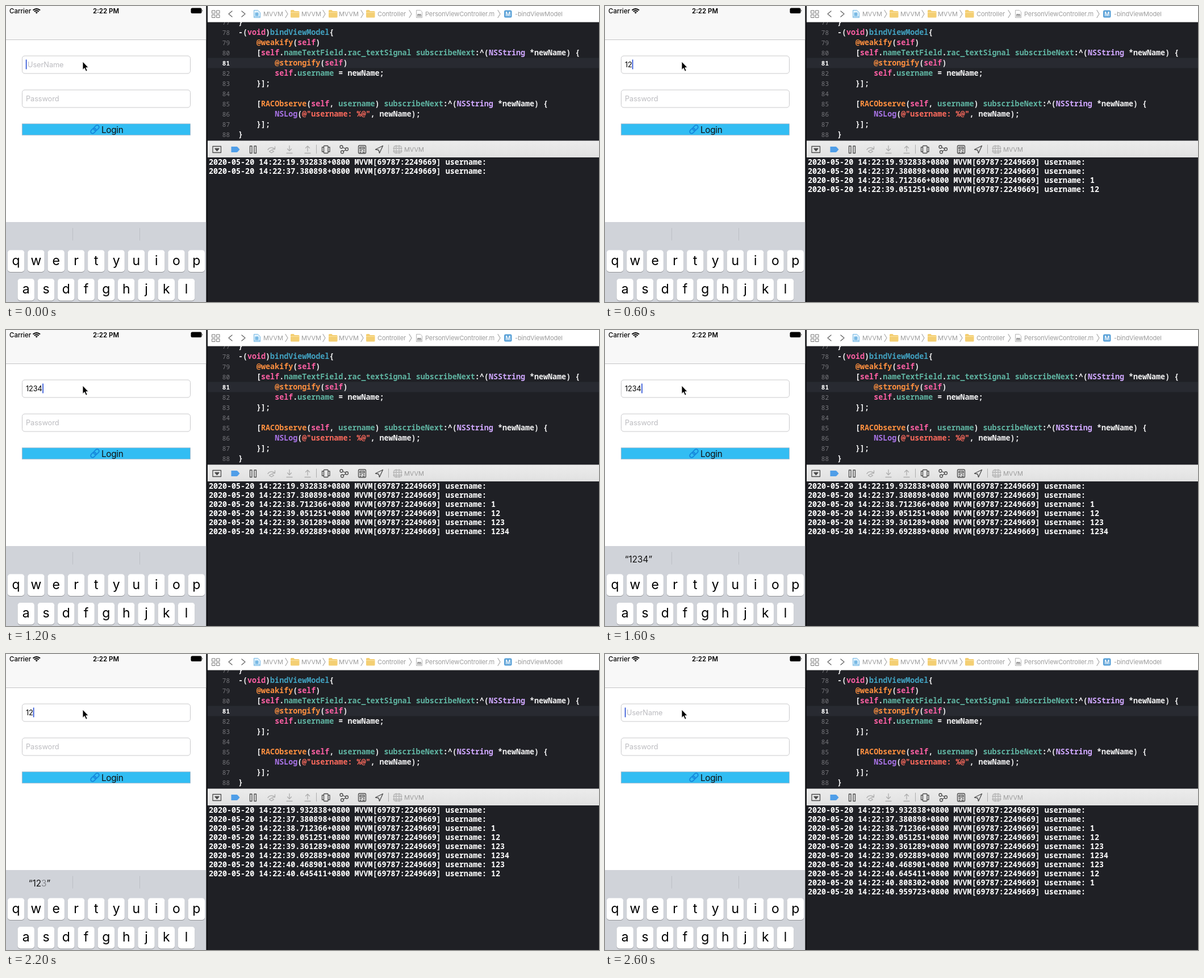
An HTML page that plays this animation: 1044 px wide and 522 px high, repeating every 3000 ms.

```html
<!DOCTYPE html>
<html lang="en">
<head>
<meta charset="utf-8">
<title>Text field binding</title>
<style>
  html, body { margin: 0; width: 100%; height: 100%; overflow: hidden; background: #1f2025; }
  svg { display: block; width: 100%; height: 100%; font-family: Inter, Roboto, sans-serif; }
  text { white-space: pre; }
  .line { fill: none; stroke: #4c4c4c; stroke-width: 1.3; stroke-linejoin: round; stroke-linecap: round; }
  .faint { stroke: #adadad; }
  .field { fill: #fff; stroke: #c9c9cb; }
  .input { font-size: 12.8px; letter-spacing: -.1px; }
  .hint { fill: #bcbcc0; }
  .key { font-size: 23px; text-anchor: middle; }
  .crumb { font-size: 11px; letter-spacing: -.12px; fill: #9c9c9c; }
  .mono { font: 600 13.37px "Noto Sans Mono", "DejaVu Sans Mono", monospace; fill: #f2f2f3; }
  .log { font-weight: 700; fill: #fff; }
  .num { font: 11px "Noto Sans Mono", monospace; fill: #77777c; text-anchor: end; }
  .macro { fill: #fd8f3f; }
  .word { fill: #fc5fa3; font-weight: 700; }
  .str { fill: #fc6a5d; }
  .type { fill: #d0a8ff; }
  .call { fill: #a873e6; }
  .name { fill: #41a1c0; }
  .prop { fill: #5fb3a1; }
</style>
</head>
<body>
<svg viewBox="0 0 1044 522">
  <defs>
    <linearGradient id="bar" x2="0" y2="1">
      <stop stop-color="#ececec"/><stop offset="1" stop-color="#e1e1e1"/>
    </linearGradient>
  </defs>

  <!-- editor and console -->
  <rect x="352" width="692" height="522" fill="#1f2025"/>
  <rect x="355" y="91.5" width="689" height="18" fill="#282a31"/>
  <g id="code"></g>
  <g id="log"></g>

  <!-- path bar -->
  <rect x="355" width="689" height="28.5" fill="#fff"/>
  <g class="line" stroke-width="1">
    <path d="M363 8h5v5h-5zM371 8h5v5h-5zM363 15.500h5v5h-5zM371 15.500h5v5h-5z" style="stroke:#777;stroke-width:1"/>
    <path d="M398 9l-6 5 6 5M415 9l6 5-6 5" style="stroke:#666"/>
  </g>
  <path d="M436.500 7.500h7l4 4v9h-11z" fill="#dff1fd" stroke="#78b9e4"/>
  <path d="M439 12h5v5h-5zM437 18.500h10" fill="#78b9e4" stroke="#78b9e4"/>
  <path d="M722.500 7.500h7l3 3v10h-10z" fill="#fff" stroke="#b5b5b5"/>
  <text x="724" y="18.500" font-size="8" font-weight="700" fill="#666">m</text>
  <rect x="877" y="7.500" width="13.500" height="13" rx="2.500" fill="#5ba2d8"/>
  <text x="879.300" y="17.700" font-size="10" font-weight="600" fill="#fff">M</text>
  <g id="crumbs"></g>

  <!-- debug bar -->
  <rect x="355" y="237.500" width="689" height="29.500" fill="url(#bar)"/>
  <g class="line">
    <rect x="364" y="247.500" width="14.500" height="11"/>
    <path d="M368 251.500h7l-3.500 4z" fill="#4c4c4c"/>
    <path d="M429.500 247h3.500v12.500h-3.500zM437 247h3.500v12.500h-3.500z"/>
    <rect x="559.500" y="246.500" width="7.500" height="13" rx="1"/>
    <path d="M559 249h-2.500v8h2.500M567.500 249h2.500v8h-2.500"/>
    <circle cx="590.500" cy="248.500" r="2.500"/><circle cx="600" cy="252.500" r="2.500"/><circle cx="592" cy="257.500" r="2.500"/>
    <path d="M593 249.500l4.500 2M594 256l4-2.200"/>
    <rect x="620.500" y="246" width="13" height="14" rx="2"/>
    <path d="M623 249h8v3h-8zM623 255h3M629 255h2M623 258h2M628 258h3"/>
    <path d="M650.500 253l13-6.500-6 13-1.500-5.500z"/>
  </g>
  <g class="line faint">
    <path d="M461 253.500a7 6 0 0 1 12-1.500m.5-4v4.500h-4.500M467.500 254l4 2.500-4 2.500-4-2.500z"/>
    <path d="M499 246.500v9m-3.500-3.500l3.500 3.500 3.500-3.500M494 259.500h10"/>
    <path d="M531 256v-9m-3.500 3.500l3.500-3.500 3.500 3.500M526 259.500h10"/>
    <path d="M546.500 245v15M673.500 245v15" stroke-width="1"/>
    <g stroke-dasharray="2 1.300">
      <rect x="683" y="247" width="13" height="12" rx="2"/>
      <path d="M687 246v14M692 246v14M682 251h15M682 256h15"/>
    </g>
  </g>
  <path d="M396.500 248h9.500q1 0 2 1l3.500 4-3.500 4q-1 1-2 1h-9.500z" fill="#4f9ee8"/>
  <text class="crumb" x="701" y="257">MVVM</text>

  <!-- phone -->
  <rect width="352.500" height="522" fill="#fff"/>
  <rect width="352.500" height="59" fill="#f8f8f8"/>
  <path d="M0 59.500h352.500" stroke="#c4c4c6"/>
  <text x="6" y="13" font-size="11.500" font-weight="500">Carrier</text>
  <g fill="none" stroke="#000" stroke-width="2">
    <path d="M47.500 7.500q6.300-5 12.600 0M49.800 9.800q4-3.200 8 0"/>
  </g>
  <path d="M51.600 11.200q2.200-1.600 4.400 0l-2.200 2.300z"/>
  <text x="153" y="13" font-size="11.500" font-weight="600">2:22 PM</text>
  <rect x="325.500" y="3.500" width="19" height="9.500" rx="2.500"/>
  <path d="M345.500 6.500q1.800 1.700 0 3.500z"/>

  <rect class="field" x="28.500" y="88" width="296" height="31" rx="4.500"/>
  <rect class="field" x="28.500" y="148" width="296" height="31" rx="4.500"/>
  <text class="input hint" x="38" y="107.800" id="hint">UserName</text>
  <text class="input" x="35" y="107.800" id="value"></text>
  <rect id="caret" y="94.500" width="1.700" height="17" fill="#3155d6"/>
  <text class="input hint" x="35" y="167.800">Password</text>
  <rect x="28.300" y="207.800" width="296.200" height="20" fill="#32bdf3" stroke="#a9b6c6" stroke-width=".8"/>
  <g fill="none" stroke="#1688dc" stroke-width="1.900" transform="translate(156.500 217.500) rotate(-45)">
    <rect x="-9" y="-3.300" width="10.500" height="6.600" rx="3.300"/>
    <rect x="-1.500" y="-3.300" width="10.500" height="6.600" rx="3.300"/>
  </g>
  <text x="168" y="223.500" font-size="15.300" letter-spacing="-.3" fill="#111">Login</text>

  <!-- keyboard -->
  <rect y="381" width="352.500" height="141" fill="#d0d3d9"/>
  <path d="M117.500 391.500v22M235.500 391.500v22" stroke="#bcbfc5"/>
  <text id="suggest" x="59" y="410" font-size="15.300" text-anchor="middle" fill="#111"></text>
  <g id="keys"></g>
  <rect x="352.500" width="2.500" height="522" fill="#111215"/>

  <path d="M135 98v14.500l3.300-3 2.400 5.700 2.500-1-2.400-5.500h4.400z" fill="#000" stroke="#fff" stroke-width=".9"/>
</svg>

<script>
const $ = id => document.getElementById(id);
const text = (x, y, cls, body) => `<text x="${x}" y="${y}" class="${cls}">${body}</text>`;

// Syntax colouring: first matching rule wins
const rules = [
  ['str', '@"[^"]*"'],
  ['macro', '@weakify|@strongify|RACObserve'],
  ['word', 'self|void'],
  ['type', 'NSString'],
  ['call', 'NSLog'],
  ['name', 'bindViewModel'],
  ['prop', 'nameTextField|rac_textSignal|subscribeNext|username']
];
const token = new RegExp(rules.map(r => `(?<${r[0]}>${r[1]})`).join('|'), 'g');
const paint = line => line.replace(token, (word, ...rest) => {
  const groups = rest.pop();
  return `<tspan class="${Object.keys(groups).find(k => groups[k])}">${word}</tspan>`;
});

const source = `}
-(void)bindViewModel{
    @weakify(self)
    [self.nameTextField.rac_textSignal subscribeNext:^(NSString *newName) {
        @strongify(self)
        self.username = newName;
    }];

    [RACObserve(self, username) subscribeNext:^(NSString *newName) {
        NSLog(@"username: %@", newName);
    }];
}`.split('\n');

$('code').innerHTML = source.map((line, i) => {
  const y = 33 + i * 18, n = 77 + i;
  const indent = line.length - line.trimStart().length;
  const style = n === 81 ? 'num" style="fill:#fff;font-weight:700' : 'num';
  return text(394, y, style, n) + text(409 + indent * 8.02, y, 'mono', paint(line.trim()));
}).join('');

const crumbs = [[453, 'MVVM', 494], [520, 'MVVM', 560], [586, 'MVVM', 627], [654, 'Controller', 712],
  [738, 'PersonViewController.m', 868], [896, '-bindViewModel']];
$('crumbs').innerHTML = crumbs.map(([x, label, arrow]) => text(x, 18, 'crumb', label) +
  (arrow ? `<path class="line faint" d="M${arrow - 2} 7.500l4 6.500-4 6.500"/>` : '')).join('') +
  [501, 568, 634].map(x => `<path d="M${x} 8.500q0-1.500 1.500-1.500h4l1.500 2h7q1.500 0 1.500 1.500v8.500q0 1.500-1.500 1.500h-12.500q-1.500 0-1.500-1.500z" fill="#f4cf73"/>
    <path d="M${x} 11.500h15.500" stroke="#fae3a6"/>`).join('');

const keyRow = (letters, x0, y) => [...letters].map((c, i) => {
  const x = x0 + i * 35.3;
  const cap = (dy, fill) => `<rect x="${x - 14.7}" y="${y + dy}" width="29.400" height="38.500" rx="4.700" fill="${fill}"/>`;
  return cap(1, '#8f9196') + cap(0, '#fff') + text(x, y + 26, 'key', c);
}).join('');
$('keys').innerHTML = keyRow('qwertyuiop', 17.6, 430.5) + keyRow('asdfghjkl', 35.2, 481);

// Typing: four characters go in, then four are deleted
const edits = [200, 400, 800, 1200, 2000, 2200, 2400, 2600];
const typed = n => '1234'.slice(0, 4 - Math.abs(4 - n));
const caretX = [34.8, 40.3, 47.8, 56, 64.2];
const stamps = ['19.932838', '37.380898', '38.712366', '39.051251', '39.361289',
  '39.692889', '40.468901', '40.645411', '40.808302', '40.959723'];
$('log').innerHTML = stamps.map((s, i) => text(357, 279.5 + i * 16, 'mono log',
  `2020-05-20 14:22:${s}+0800 MVVM[69787:2249669] username: ${typed(Math.max(0, i - 1))}`)).join('');
const logRows = [...$('log').children];

function suggestion(t) {
  if (t < 1400 || t >= 2600) return '';
  if (t < 2200) return '“1234”';
  return t < 2400 ? '“12<tspan fill="#85878c">3</tspan>”' : '“12”';
}

let shown = -1;
function draw() {
  const t = performance.now() % 3000;
  const step = Math.floor(t / 200);
  if (step !== shown) {
    shown = step;
    const n = edits.filter(e => e <= t).length;
    const value = typed(n);
    $('value').textContent = value;
    $('hint').style.display = value ? 'none' : '';
    $('caret').setAttribute('x', caretX[value.length]);
    $('suggest').innerHTML = suggestion(t);
    logRows.forEach((row, i) => row.style.display = i < n + 2 ? '' : 'none');
  }
  requestAnimationFrame(draw);
}
draw();
</script>
</body>
</html>
```
